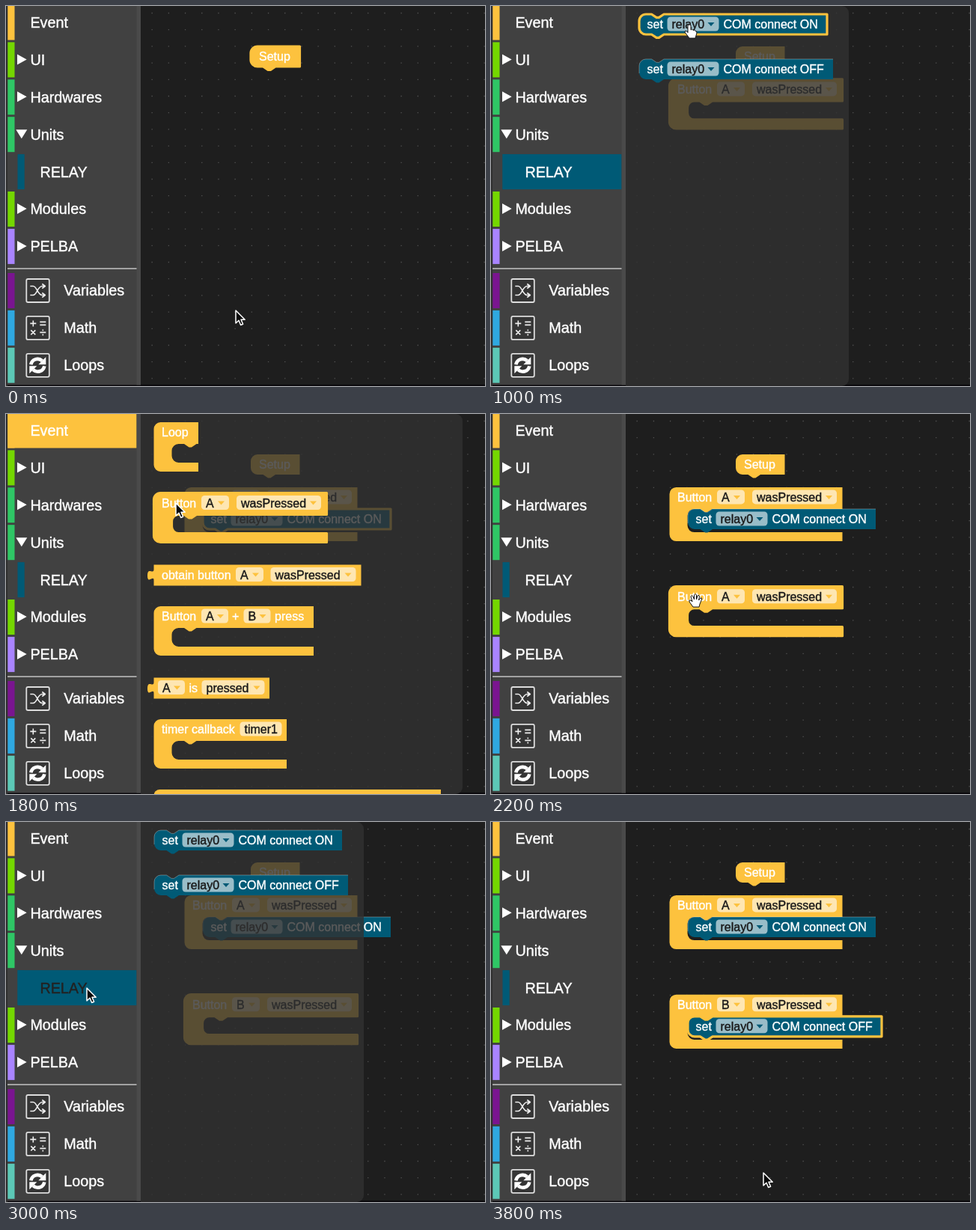
An HTML page for the animation above (4000 ms loop, 640 by 508 pixels).

```html
<!DOCTYPE html>
<html lang="en">
<head>
<meta charset="utf-8">
<title>Block editor</title>
<style>
  html, body { margin: 0; width: 100%; height: 100%; overflow: hidden; background: #1e1e1e; }
  svg { display: block; width: 100vw; height: 100vh; }
  text { font: 16px "Liberation Sans", Arial, sans-serif; white-space: pre; stroke-width: .4px; }
  .row { font-size: 19.8px; }
</style>
</head>
<body>
<svg id="stage" viewBox="0 0 640 508"></svg>
<script>
const STEP = 200, STEPS = 20;
const YELLOW = '#fdc23e', TEAL = '#005a76';
const stage = document.getElementById('stage');

const rect = (x, y, w, h, fill, r = 0) =>
  `<rect x="${x}" y="${y}" width="${w}" height="${h}" rx="${r}" fill="${fill}"/>`;
const path = (d, fill, stroke = 'none', width = 1) =>
  `<path d="${d}" fill="${fill}" stroke="${stroke}" stroke-width="${width}" stroke-linejoin="round"/>`;
const text = (s, x, y, ink = '#fff', cls = '') =>
  `<text class="${cls}" x="${x}" y="${y}" fill="${ink}" stroke="${ink}">${s}</text>`;
const at = (x, y, s) => `<g transform="translate(${x} ${y})">${s}</g>`;

// Fields: [label, x] is plain text; [label, x, width, arrow] is a pill
function fields(list, color) {
  return list.map(([label, x, w, arrow]) => {
    if (!w) return text(label, x, 19);
    const tip = arrow ? path(`M${x + w - 15} 11h9l-4.5 5z`, color) : '';
    return rect(x, 3.5, w, 19, 'rgba(255,255,255,.6)', 4.5) + text(label, x + 6, 19, '#1a1a1a') + tip;
  }).join('');
}

function block(x, y, d, color, list, selected) {
  const edge = selected ? path(d, color, YELLOW, 3.2) : path(d, color);
  return at(x, y, edge + fields(list, color));
}

const TAB = 'l-6.6 4.4h-3.3l-6.6-4.4';
const EMPTY = 25, FILLED = 31.2;

function wrapBlock(x, y, w, list, selected, gap = EMPTY) {
  const d = `M0 9a9 9 0 0 1 9-9H${w}v29H57${TAB}H33a9 9 0 0 0-9 9v${gap - 18}` +
    `a9 9 0 0 0 9 9H${w}v12H9a9 9 0 0 1-9-9z`;
  return block(x, y, d, YELLOW, list, selected);
}

function valueBlock(x, y, w, list) {
  const d = `M0 0H${w}V28H0V21c0-8-8.5 6-8.5-6.5S0 14 0 6z`;
  return block(x, y, d, YELLOW, list);
}

function setup(selected) {
  const d = `M0 9a9 9 0 0 1 9-9H65.5V27H33${TAB}H9a9 9 0 0 1-9-9z`;
  return block(327, 54, d, YELLOW, [['Setup', 11]], selected);
}

function relayBlock(x, y, mode, selected) {
  const w = mode === 'ON' ? 251 : 259;
  const top = `a9 9 0 0 1 9-9H16.5l6.6 4.4h3.3l6.6-4.4H${w}`;
  const d = `M0 9${top}V27H33${TAB}H9a9 9 0 0 1-9-9z`;
  const list = [['set', 10.5], ['relay0', 37.5, 69, true], ['COM connect ' + mode, 112.5]];
  const shine = selected ? '' : at(x, y, path(`M0 19V9${top}`, 'none', 'rgba(255,255,255,.3)'));
  return block(x, y, d, TEAL, list, selected) + shine;
}

const buttonFields = key => [['Button', 10.5], [key, 63.5, 37, true], ['wasPressed', 110.5, 113, true]];
const button = (x, y, key, selected, gap) => wrapBlock(x, y, 231, buttonFields(key), selected, gap);

function eventFlyout() {
  return wrapBlock(197.5, 11, 59.5, [['Loop', 10.5]]) +
    button(197.5, 105.5, 'A', true) +
    valueBlock(197.5, 201.5, 277,
      [['obtain button', 10.5], ['A', 109.5, 37, true], ['wasPressed', 156, 114, true]]) +
    wrapBlock(197.5, 257, 213.5,
      [['Button', 10.5], ['A', 63.5, 36, true], ['+', 104.5], ['B', 120, 36, true], ['press', 161.5]]) +
    valueBlock(197.5, 352.5, 154.5, [['A', 5.5, 36, true], ['is', 47], ['pressed', 64, 84, true]]) +
    wrapBlock(197.5, 408, 177.5, [['timer callback', 10.5], ['timer1', 115, 56]]) +
    path('M197.5 510a8 8 0 0 1 8-8H581v9z', YELLOW);
}

const relayFlyout = hit => relayBlock(198, 11, 'ON', hit === 'ON') + relayBlock(198, 71, 'OFF', hit === 'OFF');

const panel = right =>
  path(`M180 0H${right - 9}a9 9 0 0 1 9 9V499a9 9 0 0 1-9 9H180z`, 'rgba(49,49,49,.8)');

const CURSORS = {
  arrow: path('M0 0V17L4 13.3 6.6 19.5 9.6 18.2 7 12.2H12.2z', '#0a0a0a', '#fff', 1.5),
  point: path('M-2 1Q0-1.5 2 1V7Q4 5 5 7.5 7 6 8 8.5 10 8 10 11L8 18H0L-6 10Q-6 7.5-4 8.5L-2 10.5z', '#fff', '#111'),
  grab: path('M-3 9L-8 2Q-9-1-6 0L-4 2-6-5Q-5-8-3-5L-1.5-1V-7Q0-10 1.5-7V-1L3-6Q5-8 5.5-5L4.5 0 7-3Q9-4 8.5-1L6 5 5 9z', '#fff', '#111')
};

// [label, row top, bar color, marker]
const ROWS = [
  ['Event', -1.5, YELLOW], ['UI', 48.4, '#74d700', 'shut'], ['Hardwares', 98.3, '#2fc665', 'shut'],
  ['Units', 148.2, '#2fc665', 'open'], ['RELAY', 198.1, TEAL, 'child'],
  ['Modules', 248, '#74d700', 'shut'], ['PELBA', 297.9, '#a984ff', 'shut'],
  ['Variables', 357, '#7a1590', 'icon'], ['Math', 406.9, '#2fa8e0', 'icon'], ['Loops', 456.8, '#5cc8b6', 'icon']
];

const ICONS = {
  Variables: path('M-10-6h4c5 0 6 12 12 12h3M-10 6h4c5 0 6-12 12-12h3M6-9l4 3-4 3M6 3l4 3-4 3', 'none', '#eee', 1.6),
  Math: path('M-10-6h8M-6-10v8M3-8h8M3-4h8M-9 3l6 6M-3 3l-6 6M3 6h8M7 2v1.8M7 8.2V10', 'none', '#eee', 1.6),
  Loops: path('M-9-1A9 9 0 0 1 6-6M9 1A9 9 0 0 1-6 6', 'none', '#fff', 4.6) +
    path('M11-11V-1H1zM-11 11V1H-1z', '#fff')
};

function sidebarRow([label, y, color, kind], state) {
  const mode = label === 'Event' ? state.event : label === 'RELAY' ? state.relay : '';
  const child = kind === 'child', icon = kind === 'icon';
  const left = child ? 15.5 : 2.3;
  let out = rect(left, y, 9.2, 47, color);
  if (mode === 'hover') out += rect(11.5, y, 163, 47, '#e3e3e3');
  else if (mode) out += rect(left, y, 174.3 - left, 47, color);
  if (kind === 'shut') out += path(`M15 ${y + 16}v14L27.7 ${y + 23}z`, '#fff');
  if (kind === 'open') out += path(`M13.3 ${y + 17}h15l-7.5 12z`, '#fff');
  if (icon) {
    out += at(42.3, y + 23.5,
      '<rect x="-15" y="-15.5" width="30.5" height="31" rx="2" fill="#353535" stroke="#ddd" stroke-width="1.8"/>' + ICONS[label]);
  }
  const x = icon ? 77.2 : child ? 45.4 : 32.4;
  const ink = mode === 'hover' || mode === 'dark' ? '#222' : '#fff';
  return out + text(label, x, y + 30.4, ink, 'row');
}

function sidebar(state) {
  return rect(0, 0, 180, 506.5, '#414141') + rect(174.5, 0, 5.5, 506.5, '#4a4a4a') + rect(0, 0, 2, 508, '#303030') +
    ROWS.map(r => sidebarRow(r, state)).join('') + rect(2, 350.3, 172.5, 1.5, '#c4c4c4');
}

function grid() {
  let dots = '';
  for (let y = 9.5; y < 506; y += 22.2)
    for (let x = 194.5; x < 640; x += 22.2) dots += `M${x.toFixed(1)} ${y.toFixed(1)}h1.3`;
  return rect(180, 0, 460, 508, '#1e1e1e') + path(dots, 'none', '#525252', 1.3) + rect(0, 506.3, 640, 2, '#08060a');
}
const GRID = grid();

function workspace(n) {
  let out = setup(n < 3);
  if (n > 2) out += button(238.5, 97.9, 'A', n < 6, n > 6 ? FILLED : EMPTY);
  if (n === 6) out += relayBlock(258, 138, 'ON', true);
  if (n > 6) out += relayBlock(263, 127, 'ON', n < 10);
  if (n === 10) out += button(232, 216, 'A', true);
  if (n > 10) out += button(238.5, 230.7, n < 13 ? 'A' : 'B', n < 18, n === 19 ? FILLED : EMPTY);
  if (n === 18) out += relayBlock(258, 271, 'OFF', true);
  if (n === 19) out += relayBlock(263, 259.8, 'OFF', true);
  return out;
}

// One entry per step: cursor x, y, shape, then menu state
const TIMELINE = [
  [307, 407, 'arrow'],
  [100, 26, 'arrow', { event: 'hover' }],
  [227, 119, 'arrow', { event: 'on', fly: 'event' }],
  [273, 116, 'grab'],
  [108, 222, 'arrow', { relay: 'dark', fly: 'relay' }],
  [265, 25, 'point', { relay: 'on', fly: 'relay', hit: 'ON' }],
  [326, 154, 'grab'],
  [235, 98, 'arrow'],
  [116, 38, 'arrow', { event: 'hover' }],
  [227, 119, 'arrow', { event: 'on', fly: 'event' }],
  [266, 233, 'grab'],
  [273, 249, 'grab'],
  [325, 240, 'point'],
  [320, 275, 'arrow'],
  [200, 238, 'arrow'],
  [108, 222, 'arrow', { relay: 'dark', fly: 'relay' }],
  [190, 150, 'arrow', { relay: 'on', fly: 'relay' }],
  [265, 85, 'point', { relay: 'on', fly: 'relay', hit: 'OFF' }],
  [325, 287, 'grab'],
  [364, 469, 'arrow']
];

function draw(n) {
  const [x, y, shape, state = {}] = TIMELINE[n];
  let fly = '';
  if (state.fly === 'event') fly = panel(610) + eventFlyout();
  if (state.fly === 'relay') fly = panel(478) + relayFlyout(state.hit);
  stage.innerHTML = GRID + workspace(n) + fly + sidebar(state) + at(x, y, CURSORS[shape]);
}

let shown = -1;
function tick() {
  const n = Math.floor(performance.now() / STEP) % STEPS;
  if (n !== shown) draw(shown = n);
  requestAnimationFrame(tick);
}
tick();
</script>
</body>
</html>
```
